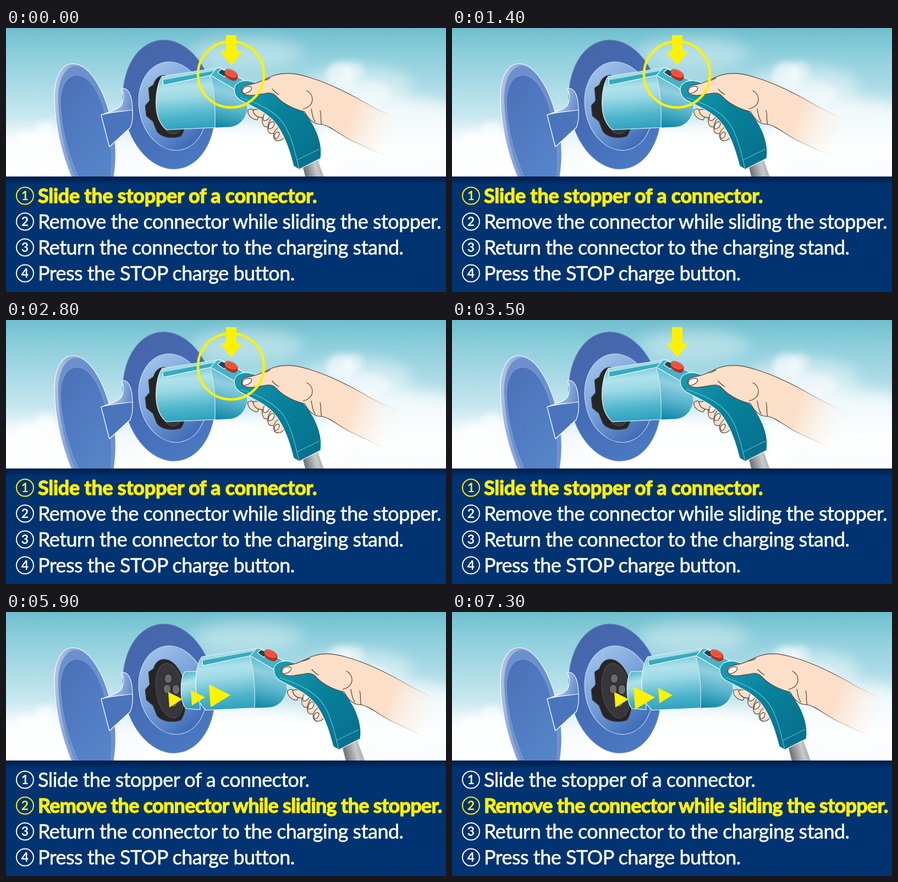
An HTML page for the animation above (8000 ms loop, 800 by 480 pixels).

```html
<!DOCTYPE html>
<html lang="en">
<head>
<meta charset="utf-8">
<title>Unplugging the charging connector</title>
<style>
  html, body { margin: 0; width: 100%; height: 100%; overflow: hidden; }
  svg { display: block; width: 800px; height: 480px; }
  .white { stroke: #fff; stroke-width: 1.1; stroke-linejoin: round; }
  .hand path { fill: url(#skin); stroke: url(#ink); stroke-width: 1.2; stroke-linecap: round; stroke-linejoin: round; }
  .hand .crease { fill: none; }
  .hand .nail { fill: #fff6ef; }
  .yellow { fill: #fff100; }
  .step { font: 36px Lato, sans-serif; letter-spacing: -.53px; fill: #fff; }
  .step circle { fill: none; stroke: #fff; stroke-width: 2; }
  .step .digit { font-size: 23px; font-weight: 700; letter-spacing: 0; text-anchor: middle; }
  .step .label { stroke: #fff; stroke-width: .6px; }
  .step.on { fill: #fff100; }
  .step.on circle { stroke: #fff100; }
  .step.on .label { font-weight: 700; letter-spacing: -.28px; stroke: #fff100; stroke-width: 1.3px; }
  .step.long.on .label { letter-spacing: -.71px; }
</style>
</head>
<body>
<svg viewBox="0 0 800 480">
  <defs>
    <linearGradient id="sky" x2="0" y2="1">
      <stop stop-color="#6fbecd"/><stop offset=".15" stop-color="#89cdda"/><stop offset=".38" stop-color="#a9dae5"/>
      <stop offset=".58" stop-color="#c6e7ef"/><stop offset=".8" stop-color="#f4fafc"/><stop offset="1" stop-color="#fdfdfd"/>
    </linearGradient>
    <linearGradient id="panel" x2="0" y2="1">
      <stop stop-color="#001d49"/><stop offset=".07" stop-color="#003370"/><stop offset="1" stop-color="#003371"/>
    </linearGradient>
    <linearGradient id="ring" x1=".3" x2=".6" y2="1">
      <stop stop-color="#4765a9"/><stop offset=".5" stop-color="#456cb5"/><stop offset="1" stop-color="#4a79c2"/>
    </linearGradient>
    <linearGradient id="well" x1=".2" x2=".6" y2="1">
      <stop stop-color="#a5c5ea"/><stop offset=".45" stop-color="#7ba5dc"/><stop offset="1" stop-color="#3f6bb6"/>
    </linearGradient>
    <linearGradient id="rim" x2="1" y2=".2">
      <stop stop-color="#b9c8e4"/><stop offset=".3" stop-color="#8ea9d8"/><stop offset="1" stop-color="#5f86c6"/>
    </linearGradient>
    <linearGradient id="lid" x2=".6" y2="1">
      <stop stop-color="#4a70b8"/><stop offset="1" stop-color="#5584c9"/>
    </linearGradient>
    <linearGradient id="hinge" x2="1" y2=".4">
      <stop stop-color="#dce6f4"/><stop offset=".5" stop-color="#a4bce2"/><stop offset="1" stop-color="#5a83c6"/>
    </linearGradient>
    <linearGradient id="barrel" x1=".42" x2=".55" y2="1">
      <stop stop-color="#4db8cb"/><stop offset=".28" stop-color="#b0e2eb"/><stop offset=".45" stop-color="#9cd9e5"/>
      <stop offset=".75" stop-color="#4db5cc"/><stop offset="1" stop-color="#2a9dba"/>
    </linearGradient>
    <linearGradient id="back" x1=".6" x2=".45" y2="1">
      <stop stop-color="#3fb0c5"/><stop offset=".4" stop-color="#8fcfdf"/>
      <stop offset=".7" stop-color="#54b2ca"/><stop offset="1" stop-color="#128ba8"/>
    </linearGradient>
    <linearGradient id="grip" x2="1" y2="1">
      <stop stop-color="#1a9db3"/><stop offset=".45" stop-color="#08819b"/><stop offset="1" stop-color="#066d8b"/>
    </linearGradient>
    <linearGradient id="cable" x2="1" y2="-.25">
      <stop stop-color="#77797d"/><stop offset=".45" stop-color="#c9cacc"/><stop offset="1" stop-color="#85878a"/>
    </linearGradient>
    <linearGradient id="skin" gradientUnits="userSpaceOnUse" x1="625" y1="165" x2="705" y2="195">
      <stop stop-color="#fbdfc8"/><stop offset="1" stop-color="#fff1e5" stop-opacity="0"/>
    </linearGradient>
    <linearGradient id="ink" gradientUnits="userSpaceOnUse" x1="600" y1="160" x2="705" y2="200">
      <stop stop-color="#584237"/><stop offset="1" stop-color="#d9ad91" stop-opacity="0"/>
    </linearGradient>
    <filter id="soft" x="-30%" y="-30%" width="160%" height="160%"><feGaussianBlur stdDeviation="13"/></filter>
    <filter id="puff" x="-30%" y="-30%" width="160%" height="160%"><feGaussianBlur stdDeviation="6"/></filter>
    <clipPath id="scene"><path d="M0 0H800V270H0Z"/></clipPath>
  </defs>

  <g clip-path="url(#scene)">
    <path fill="url(#sky)" d="M0 0H800V270H0Z"/>
    <g fill="#fff" filter="url(#soft)">
      <ellipse cx="440" cy="45" rx="100" ry="28" opacity=".35"/>
      <ellipse cx="640" cy="105" rx="100" ry="35" opacity=".45"/>
      <ellipse cx="60" cy="228" rx="120" ry="42" opacity=".7"/>
      <ellipse cx="720" cy="190" rx="150" ry="62" opacity=".75"/>
      <ellipse cx="430" cy="235" rx="190" ry="60" opacity=".9"/>
    </g>
    <g fill="#fff" filter="url(#puff)">
      <circle cx="72" cy="190" r="20" opacity=".65"/>
      <circle cx="38" cy="207" r="20" opacity=".6"/>
      <circle cx="608" cy="86" r="25" opacity=".6"/>
      <circle cx="632" cy="78" r="18" opacity=".45"/>
      <ellipse cx="655" cy="118" rx="45" ry="22" opacity=".5"/>
    </g>

    <g class="white">
      <path fill="url(#rim)" d="M122 65C98 65 87 95 88 130C89 180 102 235 125 285H193C202 240 200 200 190 165C178 110 150 65 122 65Z"/>
      <path fill="#6c90cd" stroke="none" d="M128 69C104 70 94 100 95 134C97 183 109 235 132 285H193C202 240 200 200 190 165C178 113 152 69 128 69Z"/>
      <path fill="url(#lid)" stroke="#7e9fd7" d="M129 86C108 86 98 110 99 140C101 185 114 235 138 285H188C196 243 192 202 183 168C174 122 153 86 129 86Z"/>
      <ellipse fill="url(#ring)" stroke="#6585bf" cx="296" cy="139" rx="82.5" ry="118" transform="rotate(-9 296 139)"/>
      <ellipse fill="url(#well)" stroke="#cbdcf2" cx="303" cy="142" rx="61" ry="81" transform="rotate(-11 303 142)"/>
      <path fill="url(#hinge)" d="M210 111C218 107 226 115 229 134C231 153 230 169 226 181L188 216L173 158C190 151 207 148 211 138C215 128 214 118 210 111Z"/>
      <path fill="#4a75bc" d="M173 158C193 152 212 152 230 149C231 163 229 174 226 181L188 216Z"/>
    </g>

    <g stroke="#55555a">
      <path fill="#262526" d="M285 86C276 87 270 95 268 103L259 109L261 132L253 141L255 160L267 170L274 188C283 200 302 202 318 197C326 187 329 165 327 142C322 110 306 84 285 86Z"/>
      <ellipse fill="#37363a" cx="298" cy="143" rx="25" ry="50" transform="rotate(-9 298 143)"/>
      <g fill="#69696e" stroke="#151515">
        <ellipse cx="295" cy="121" rx="7" ry="8.500"/><ellipse cx="293" cy="140" rx="7" ry="8.500"/>
        <ellipse cx="309" cy="141" rx="7" ry="9"/><ellipse cx="304" cy="164" rx="7.500" ry="9"/>
      </g>
    </g>

    <g id="plug">
      <path id="nozzle" class="white" fill="url(#barrel)" d="M278 114L254 115C244 122 243 170 255 182L281 184Z"/>
      <path fill="url(#cable)" d="M539 250L566 238L582 282H547Z"/>
      <g class="white">
        <path fill="url(#barrel)" d="M284 88L383 73L433 97L439 148C434 168 423 179 404 180L292 185C278 174 272 155 273 132C274 110 277 97 284 88Z"/>
        <path fill="url(#back)" stroke="none" d="M371 86L395 76L433 97L439 148C434 168 423 179 404 180L380 181C381 145 379 112 371 86Z"/>
        <path fill="none" stroke="#d5eff4" d="M371 86C379 112 381 145 380 181"/>
        <path fill="#35abbe" d="M284 88L383 73L372 86L286 104Z"/>
        <path fill="#a3dbe5" stroke="none" d="M284 88L383 73L379 78L285 95Z"/>
        <path fill="#46b3c6" d="M372 86L383 73Q389 71 396 75L434 96L417 112Z"/>
        <path fill="#064f62" d="M385 81L391 75L403 79L397 89Z"/>
      </g>
      <g stroke="#9d2018">
        <path fill="#c9281d" d="M398 80C398 73 407 74 415 79C421 83 422 87 420 92C418 97 412 96 405 92C398 88 397 85 398 80Z"/>
        <path fill="#ee4f38" stroke="#ff8b72" d="M399 79C401 73 409 76 415 80C421 84 420 90 414 89C407 88 397 84 399 79Z"/>
      </g>
      <g class="hand">
        <path d="M440 149C438 158 448 167 457 167L463 155L446 147Z"/>
        <path d="M474 149C467 153 463 169 468 177C473 184 485 177 491 166C494 154 484 147 474 149Z"/>
        <path d="M486 162C477 168 473 183 478 190C485 196 499 187 503 177C503 168 495 160 486 162Z"/>
        <path d="M500 179C490 181 483 194 488 202C493 208 503 205 507 197Z"/>
        <path d="M449 150C453 146 463 148 474 151L470 163C463 163 452 163 449 150Z"/>
        <path class="nail" d="M468 160C471 151 479 151 480 156C480 164 474 170 468 168Z"/>
        <path class="nail" d="M478 176C482 168 488 169 488 174C487 181 482 184 477 183Z"/>
        <path class="nail" d="M488 195C491 188 496 188 497 192C496 199 493 201 489 201Z"/>
      </g>
      <g class="white">
        <path fill="url(#grip)" d="M415 111C416 100 428 94 441 96C485 106 525 128 549 161C567 186 576 214 572 237L533 257L523 251C516 225 510 205 498 185C483 157 456 146 426 131C418 126 415 119 415 111Z"/>
        <path fill="none" stroke="#6cc8d6" d="M426 126C468 140 494 155 508 179C521 203 527 231 533 257"/>
        <path fill="none" stroke="#58bccb" d="M529 240L570 220"/>
      </g>
      <g class="hand">
        <path d="M429 112C429 104 440 104 452 101C463 98 474 92 485 87C508 79 530 83 552 90C592 102 630 122 662 141C688 155 705 162 722 169V247C690 234 657 218 627 204C604 192 591 179 574 175C560 176 550 166 543 152C525 148 506 139 494 127C489 121 485 118 477 118C461 120 445 125 435 121C430 119 428 116 429 112Z"/>
        <path class="nail" d="M430 113C431 107 440 105 446 107C449 112 441 118 433 119C430 118 429 116 430 113Z"/>
        <path class="crease" d="M467 96Q474 95 480 91M540 147C551 145 558 137 557 128C556 120 551 116 547 114M555 147C557 156 557 164 562 170M571 150C574 158 571 168 574 175M484 111Q490 118 496 121"/>
      </g>
    </g>

    <g class="yellow">
      <g id="press">
        <path d="M400 13H419V42H430L409.500 68L389 42H400Z"/>
        <circle id="ring-mark" cx="409" cy="84.500" r="60" fill="none" stroke="#fff100" stroke-width="4.500"/>
      </g>
      <g id="pull">
        <path d="M-12-13L14 0L-10 15Z"/><path d="M-12-13L14 0L-10 15Z"/><path d="M-12-13L14 0L-10 15Z"/>
      </g>
    </g>
  </g>

  <path fill="url(#panel)" d="M0 270H800V480H0Z"/>
  <g id="steps"></g>
</svg>
<script>
  const LOOP = 8000, BEAT = 700, PULL_START = 4500;
  const byId = id => document.getElementById(id);
  const show = (id, on) => byId(id).setAttribute('visibility', on ? 'inherit' : 'hidden');

  const labels = [
    'Slide the stopper of a connector.',
    'Remove the connector while sliding the stopper.',
    'Return the connector to the charging stand.',
    'Press the STOP charge button.'
  ];
  byId('steps').innerHTML = labels.map((label, i) => `
    <g class="step" transform="translate(0 ${305 + i * 47})">
      <circle cx="34.5" r="15.500"/>
      <text class="digit" x="34.5" y="8">${i + 1}</text>
      <text class="label" x="58" y="13">${label}</text>
    </g>`).join('');
  const steps = [...byId('steps').children];
  steps[1].classList.add('long');
  const arrows = [...byId('pull').children];
  const arrowCentres = [[307, 158.5], [348, 155], [387, 151]];

  function draw(t) {
    const pulling = t >= PULL_START;
    steps.forEach((step, i) => step.classList.toggle('on', i === +pulling));
    byId('plug').setAttribute('transform', pulling ? 'translate(72 -6.5)' : '');
    show('nozzle', pulling);
    show('press', !pulling);
    show('pull', pulling);
    show('ring-mark', !pulling && t < 5 * BEAT && Math.floor(t / BEAT) % 2 === 0);
    const large = Math.floor((t - PULL_START) / BEAT) % 3;
    arrows.forEach((arrow, i) => arrow.setAttribute('transform',
      `translate(${arrowCentres[i]}) scale(${i === large ? 1.5 : 1})`));
  }

  function tick() {
    draw(performance.now() % LOOP);
    requestAnimationFrame(tick);
  }
  tick();
</script>
</body>
</html>
```
